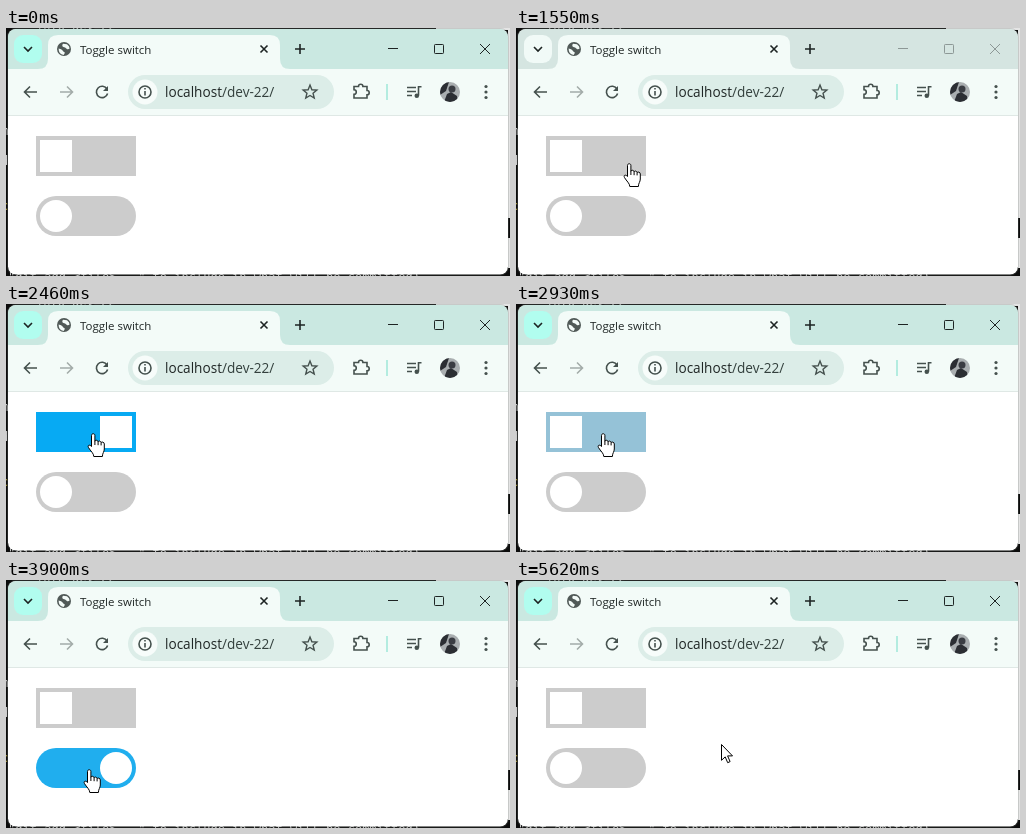
These frames come from a looping animation (504x248 px, 5820 ms). An HTML page:

```html
<!DOCTYPE html>
<html lang="en">
<head>
<meta charset="utf-8">
<title>Toggle switch</title>
<style>
  html, body { margin: 0; width: 100%; height: 100%; overflow: hidden; background: #0c0c0c; }
  svg { display: block; width: 504px; height: 248px; }
  .strip { fill: #d5e5e1; }
  .menu { fill: #f1faf7; }
  .controls { stroke: #8d9896; }
  .active .strip { fill: #cae8e1; }
  .active .menu { fill: #b1fdef; }
  .active .controls { stroke: #1d2423; }
  .line { fill: none; stroke: #45514e; stroke-width: 1.6; }
  .ui { font-family: "Open Sans", "Noto Sans", sans-serif; fill: #1f2625; }
  .term { font: 12px "DejaVu Sans Mono", monospace; fill: #ccc; white-space: pre; }
</style>
</head>
<body>
<svg id="stage" viewBox="0 0 504 248">
  <defs>
    <clipPath id="frame"><rect x="2" y="1" width="500" height="245.500" rx="8"/></clipPath>
    <clipPath id="face"><circle cx="444" cy="64" r="10"/></clipPath>
  </defs>

  <!-- terminal behind the window -->
  <rect width="504" height="248" fill="#0c0c0c"/>
  <g class="term">
    <text x="30" y="2">into dev=22</text>
    <text x="-5" y="107">modified</text>
    <text x="-5" y="137">deleted</text>
    <text x="-5" y="182" fill="#b9a53a">commit</text>
    <text x="-34" y="253">  (use "git add &lt;file&gt;..." to include in what will be committed)</text>
  </g>
  <path d="M430 0h74v190h-2V2h-72zM502 210h2v30h-2z" fill="#e4e4e4"/>

  <g clip-path="url(#frame)">
    <rect x="2" y="1" width="500" height="247" fill="#fff"/>
    <rect class="strip" x="2" y="1" width="500" height="41"/>
    <path d="M2 41H32Q42 41 42 31V17Q42 7 52 7H264Q274 7 274 17V31Q274 41 284 41H502V87H2Z" fill="#f3fbf8"/>
    <path d="M2 87.500H502" stroke="#dfe8e5"/>

    <!-- tab strip -->
    <rect class="menu" x="8" y="7" width="28" height="28" rx="9"/>
    <path class="line" d="M18 19l4 4 4-4" style="stroke:#1d2423"/>
    <circle cx="58" cy="21" r="7" fill="#505957"/>
    <path d="M52.600 20.500q3 .4 4 2t2 1.500q.5 1.500-1 3Q52.500 26 52.600 20.500zM57 15.800l4 .4q2.600 1.800 2.600 4.300-1.600 1.500-3 .2t-3.200-1.600q-2-1-.4-3.300z" fill="#f3fbf8"/>
    <text class="ui" x="74" y="25.500" font-size="11.500">Toggle switch</text>
    <path class="line" d="M254.500 17.500l7 7m0-7l-7 7M289 21h10m-5-5v10" style="stroke:#1d2423"/>
    <g class="controls" fill="none">
      <path d="M382 20.500h10M474 16l10 10m0-10l-10 10"/>
      <rect x="428.500" y="16.500" width="9" height="9" rx=".8"/>
    </g>

    <!-- toolbar -->
    <path class="line" d="M31 64H18.500m5.500-5.500l-5.500 5.500 5.500 5.500"/>
    <path class="line" d="M54 64h12.500m-5.500-5.500l5.500 5.500-5.500 5.500" style="stroke:#a3acaa"/>
    <path class="line" d="M101 61a5.700 5.700 0 1 0 .6 4.500"/>
    <path d="M102 58v5h-5z" fill="#45514e"/>
    <rect x="122" y="47" width="206" height="34" rx="17" fill="#dcede8"/>
    <circle cx="139" cy="64" r="12.500" fill="#f7fcfa"/>
    <circle class="line" cx="139" cy="64" r="6"/>
    <path class="line" d="M139 63v4.500M139 60v1.600"/>
    <text class="ui" x="159" y="69" font-size="13.600">localhost<tspan fill="#33403d">/dev-22/</tspan></text>
    <path id="star" class="line" style="stroke-width:1.400"/>
    <path class="line" d="M348 58.500h4.500a2.200 2.200 0 0 1 4.400 0h4.100v4a2.200 2.200 0 0 1 0 4.400v3.100h-13v-3.600a2.300 2.300 0 0 0 0-4.600z"/>
    <path d="M381 56v16" stroke="#b3ece0" stroke-width="2"/>
    <path class="line" d="M401 59.500h9m-9 4h9m-9 4h5M412.500 67.500v-8.700h3"/>
    <circle cx="410.800" cy="67.700" r="2.300" fill="#45514e"/>
    <g clip-path="url(#face)">
      <rect x="434" y="54" width="20" height="20" fill="#a9aeb0"/>
      <path d="M434 54h9l-3 9-6 4zM438 74l3-8 4-2 6 4 1 6z" fill="#2b2e33"/>
      <circle cx="446" cy="61" r="3.500" fill="#3a3d43"/>
    </g>
    <g fill="#45514e">
      <circle cx="480" cy="58.500" r="1.600"/><circle cx="480" cy="64" r="1.600"/><circle cx="480" cy="69.500" r="1.600"/>
    </g>

    <!-- page -->
    <rect id="track0" x="30" y="108" width="100" height="40"/>
    <rect id="knob0" x="34" y="112" width="32" height="32" fill="#fff"/>
    <rect id="track1" x="30" y="168" width="100" height="40" rx="20"/>
    <circle id="knob1" cx="50" cy="188" r="16" fill="#fff"/>
  </g>
  <rect x="1.500" y=".5" width="501" height="246.500" rx="8" fill="none" stroke="#6f7775" stroke-opacity=".25"/>

  <g id="cursor" fill="#fff" stroke="#000" stroke-linejoin="round">
    <path id="arrow" d="M.5 .5V16.300L4.200 12.900 6.700 18.700 9.100 17.600 6.600 11.900H11.500Z"/>
    <g id="hand" transform="translate(-5.500)">
      <path d="M4 13.500V2.400C4 .2 7.400 .2 7.400 2.400V8.200C7.600 6.800 10.400 6.900 10.600 8.800C11 7.600 13.400 7.800 13.600 9.600C14 8.600 16.800 8.800 16.800 11V16C16.800 19 14.900 20 14.900 23.500H6.300C6.300 20.400 3 18 1 14.600C-.2 12.400 1.800 11 4 13.500Z"/>
      <path d="M7.400 8v4M10.600 8.800v3.400M13.600 9.600v2.800" fill="none"/>
    </g>
  </g>
</svg>
<script>
const LOOP = 5820;
const BLUR = 260, FOCUS = 1980;
const OFF = [204, 204, 204], ON = [3, 169, 244];
const FADE = 500;

// Per switch: knob flips at on/off, the colour fade starts after its lag.
const switches = [
  { on: 2050, onLag: 0, off: 2660, offLag: 55 },
  { on: 3620, onLag: 0, off: 4320, offLag: 60 },
];

// Pointer moves: start, end, steps, from x y, to x y, ease-out power
const moves = [
  [860, 1410, 9, 295, 236, 130, 137, 1.3],
  [1480, 1830, 6, 120, 137, 87, 129, 1],
  [3220, 3420, 4, 87, 158, 83, 183, 1.5],
  [3620, 3620, 1, 83, 189, 83, 189, 1],
  [4600, 4880, 5, 95, 187, 184, 171, 1],
  [4950, 5220, 4, 190, 169, 202, 165, 1],
  [5550, 5620, 2, 203, 164, 205, 164, 1],
];

const $ = id => document.getElementById(id);
const clamp = v => Math.min(1, Math.max(0, v));
const mix = (a, b, p) => a + (b - a) * p;
const show = (el, on) => el.setAttribute('visibility', on ? 'visible' : 'hidden');

// CSS "ease": cubic-bezier(.25, .1, .25, 1)
function ease(x) {
  const bez = (a, b, s) => 3 * a * s * (1 - s) ** 2 + 3 * b * s * s * (1 - s) + s ** 3;
  let lo = 0, hi = 1;
  for (let i = 0; i < 20; i++) {
    const mid = (lo + hi) / 2;
    if (bez(.25, .25, mid) < x) lo = mid; else hi = mid;
  }
  return bez(.1, 1, lo);
}

function pointer(t) {
  const move = moves.filter(m => m[0] <= t).pop();
  if (!move) return null;
  const [start, end, steps, x0, y0, x1, y1, power] = move;
  const last = Math.max(1, steps - 1);
  const gap = (end - start) / last || 1;
  const k = Math.min(last, Math.floor((t - start) / gap + .01));
  const p = 1 - (1 - k / last) ** power;
  return [Math.round(mix(x0, x1, p)), Math.round(mix(y0, y1, p))];
}

function drawSwitch(s, i, t) {
  const checked = t >= s.on && t < s.off;
  const rise = ease(clamp((t - s.on - s.onLag) / FADE));
  const fall = ease(clamp((t - s.off - s.offLag) / FADE));
  const rgb = OFF.map((c, j) => Math.round(mix(c, ON[j], rise - fall)));
  $('track' + i).setAttribute('fill', `rgb(${rgb})`);
  $('knob' + i).setAttribute('transform', `translate(${checked ? 60 : 0})`);
}

function render(t) {
  $('stage').classList.toggle('active', t < BLUR || t >= FOCUS);
  switches.forEach((s, i) => drawSwitch(s, i, t));
  const pos = pointer(t);
  const [x, y] = pos || [0, 0];
  const over = x >= 30 && x < 130 && (y >= 108 && y < 148 || y >= 168 && y < 208);
  show($('arrow'), pos && !over);
  show($('hand'), pos && over);
  $('cursor').setAttribute('transform', `translate(${x} ${y})`);
}

const points = Array.from({ length: 10 }, (_, i) => {
  const r = i % 2 ? 3.2 : 7.2, a = i * Math.PI / 5;
  return `${304 + r * Math.sin(a)} ${64.3 - r * Math.cos(a)}`;
});
$('star').setAttribute('d', `M${points.join('L')}Z`);

const begin = performance.now();
function tick() {
  render((performance.now() - begin) % LOOP);
  requestAnimationFrame(tick);
}
tick();
</script>
</body>
</html>
```
